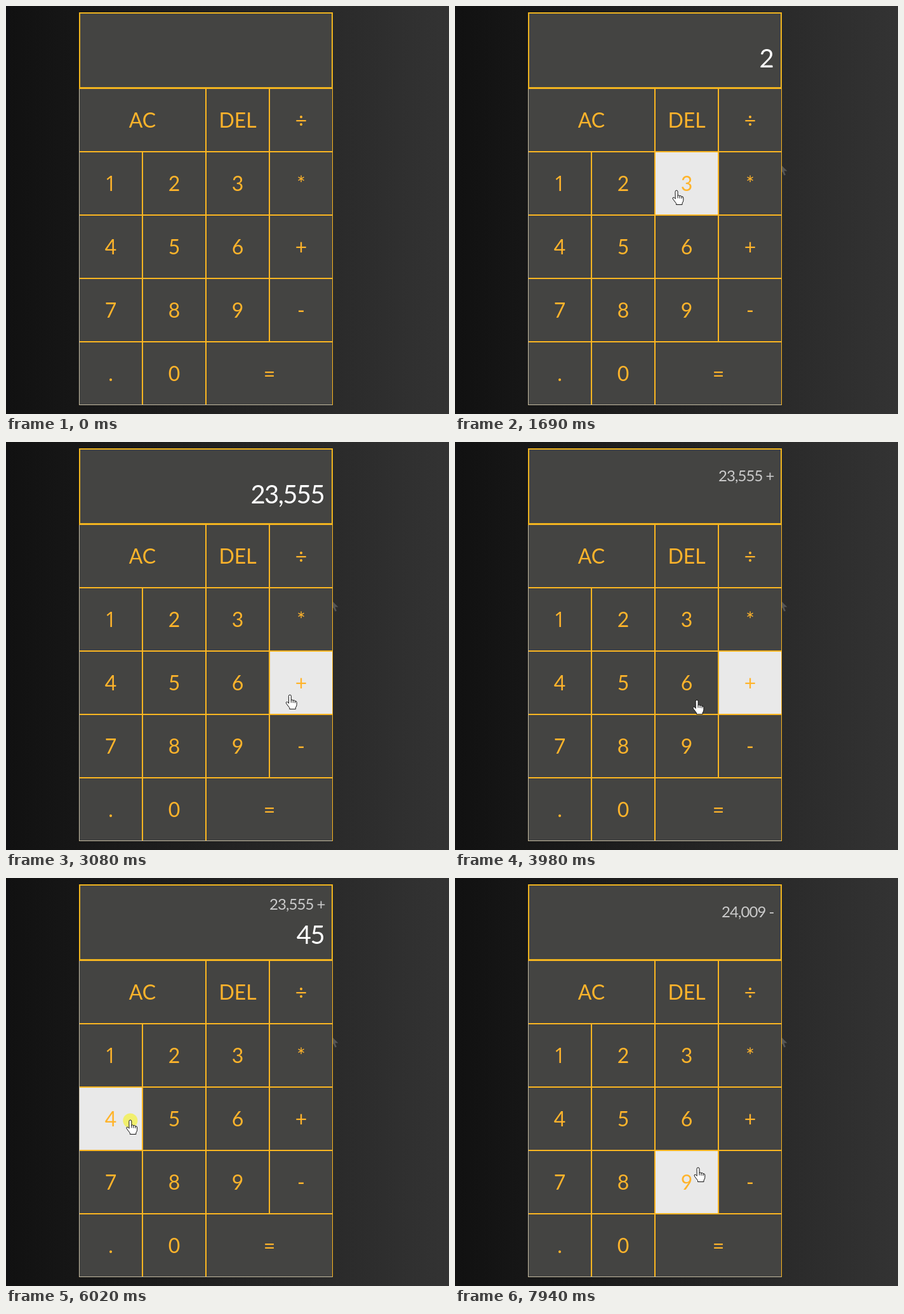
Write an HTML page that moves like this. It is 698 by 644 pixels and loops after 8 s.

```html
<!DOCTYPE html>
<html lang="en">
<head>
<meta charset="utf-8">
<title>Calculator</title>
<style>
  html, body { margin: 0; width: 100%; height: 100%; overflow: hidden; background: linear-gradient(to right, #111, #333); }
  svg { display: block; }
  text { font: 32px Lato, "Open Sans", sans-serif; fill: #ffb42b; text-anchor: middle; }
  .one { font-family: "Open Sans", "Noto Sans", sans-serif; }
  .cell { fill: #444442; stroke: #fbb621; }
  .cell.hover { fill: #e9e9e9; }
  #previous, #current { text-anchor: end; letter-spacing: -.04em; }
  #previous { font-size: 24px; fill: #cbcbcb; }
  #current { font-size: 40px; fill: #fff; }
  .cursor { fill: #fff; stroke: #111; stroke-linejoin: round; stroke-linecap: round; }
</style>
</head>
<body>
<svg width="698" height="644" viewBox="0 0 698 644">
  <defs>
    <path id="arrow" d="M0 0V16L3.8 12.5L6.5 18.5L9 17.4L6.4 11.5H11.5Z"/>
    <clipPath id="outside"><path d="M515 0H698V644H515Z"/></clipPath>
  </defs>
  <rect x="116" y="11" width="398" height="118" fill="#444442" stroke="#efb41f" stroke-width="2"/>
  <text id="previous" x="502.5"></text>
  <text id="current" x="501"></text>
  <g id="keys"></g>
  <path d="M115.5 131V629.5H514" fill="none" stroke="#c4bba2"/>
  <g id="trail" clip-path="url(#outside)"><use href="#arrow" x="512" y="249" fill="#555"/></g>
  <g id="pointer">
    <circle id="click" r="11.5" cy="1" fill="#f3f04e" opacity=".8"/>
    <use id="plain" class="cursor" href="#arrow"/>
    <g id="hand" class="cursor">
      <path d="M-2 2Q-2 0 0 0T2 2V8.5Q3.5 6.6 5 8.8Q7.2 7.5 8 9.8Q10.8 9.2 10.8 12V15.5Q10.8 18 9 20V22.5H-.5V20.5L-5.3 14.2Q-7 11.6-5 11Q-3.6 10.7-2 13Z"/>
      <path d="M2 8.5V12M5 9V12.3M8 10V12.6" fill="none"/>
    </g>
  </g>
</svg>
<script>
const LOOP = 8000, HOVER_LAG = 65;
const $ = id => document.getElementById(id);

// label, column, row, column span
const layout = [
  ['AC', 0, 0, 2], ['DEL', 2, 0], ['÷', 3, 0],
  ['1', 0, 1], ['2', 1, 1], ['3', 2, 1], ['*', 3, 1],
  ['4', 0, 2], ['5', 1, 2], ['6', 2, 2], ['+', 3, 2],
  ['7', 0, 3], ['8', 1, 3], ['9', 2, 3], ['-', 3, 3],
  ['.', 0, 4], ['0', 1, 4], ['=', 2, 4, 2]
];

// time, x, y of the pointer tip
const path = [
  [590, 600, 268], [660, 512, 250], [730, 425, 240], [800, 350, 215], [900, 270, 196],
  [1000, 205, 212], [1120, 195, 255], [1280, 250, 288], [1500, 257, 290],
  [1690, 349, 291], [1840, 350, 294], [2100, 247, 385], [2380, 230, 389],
  [2520, 242, 390], [2680, 240, 394], [2800, 300, 424], [2900, 400, 418], [3020, 446, 400],
  [3300, 452, 396], [3500, 470, 400], [3700, 466, 402], [3840, 455, 402], [3910, 420, 405],
  [3980, 382, 407], [4050, 318, 421], [4190, 316, 421], [4450, 270, 418], [4930, 195, 380],
  [5270, 195, 380], [5480, 238, 383], [5760, 240, 383], [5950, 195, 382], [6120, 197, 382],
  [6300, 310, 388], [6440, 435, 362], [6580, 499, 268], [6700, 499, 268],
  [6920, 480, 350], [7130, 460, 455], [7390, 455, 462], [7590, 453, 462],
  [7860, 392, 458], [7940, 383, 457]
];

// time, previous line, current line
const display = [
  [0, '', ''], [1420, '', '2'], [1790, '', '23'], [2240, '', '235'], [2430, '', '2,355'],
  [2640, '', '23,555'], [3220, '23,555 +', ''], [5270, '23,555 +', '4'],
  [5650, '23,555 +', '45'], [6080, '23,555 +', '454'], [7320, '24,009 -', '']
];

const clicks = [1350, 1720, 2180, 2350, 2570, 3150, 5090, 5570, 6000, 7240];

function add(tag, attrs, content = '') {
  const node = document.createElementNS('http://www.w3.org/2000/svg', tag);
  for (const name in attrs) node.setAttribute(name, attrs[name]);
  node.textContent = content;
  return $('keys').appendChild(node);
}

const keys = layout.map(([label, col, row, span = 1]) => {
  const x = 115 + col * 100, y = 130 + row * 100, w = span * 100;
  const rect = add('rect', { class: 'cell', x: x + .5, y: y + .5, width: w - 1, height: 99 });
  add('text', { x: x + w / 2, y: y + 62, class: label === '1' ? 'one' : '' }, label);
  return { rect, x, y, w };
});

function pointAt(t) {
  const i = path.findIndex(p => p[0] > t);
  if (i < 0) return path[path.length - 1].slice(1);
  if (i === 0) return [698, 268];
  const [t0, x0, y0] = path[i - 1], [t1, x1, y1] = path[i];
  const k = (t - t0) / (t1 - t0);
  return [x0 + (x1 - x0) * k, y0 + (y1 - y0) * k];
}

const keyAt = ([x, y]) => keys.find(k => x >= k.x && x < k.x + k.w && y >= k.y && y < k.y + 100);
const show = (id, on) => $(id).setAttribute('visibility', on ? 'visible' : 'hidden');

function draw(t) {
  const [, previous, current] = display.filter(d => d[0] <= t).pop();
  $('previous').textContent = previous;
  $('current').textContent = current;
  $('previous').setAttribute('y', current ? 50 : 62);
  $('current').setAttribute('y', previous ? 104 : 97);

  const tip = pointAt(t), over = keyAt(tip), hovered = keyAt(pointAt(t - HOVER_LAG));
  for (const key of keys) key.rect.classList.toggle('hover', key === hovered);

  const visible = t >= path[0][0];
  $('pointer').setAttribute('transform', `translate(${tip})`);
  show('hand', visible && over);
  show('plain', visible && !over);
  show('click', clicks.some(c => t >= c && t < c + 140));
  show('trail', t >= 700);
}

function frame() {
  draw(performance.now() % LOOP);
  requestAnimationFrame(frame);
}
frame();
</script>
</body>
</html>
```
